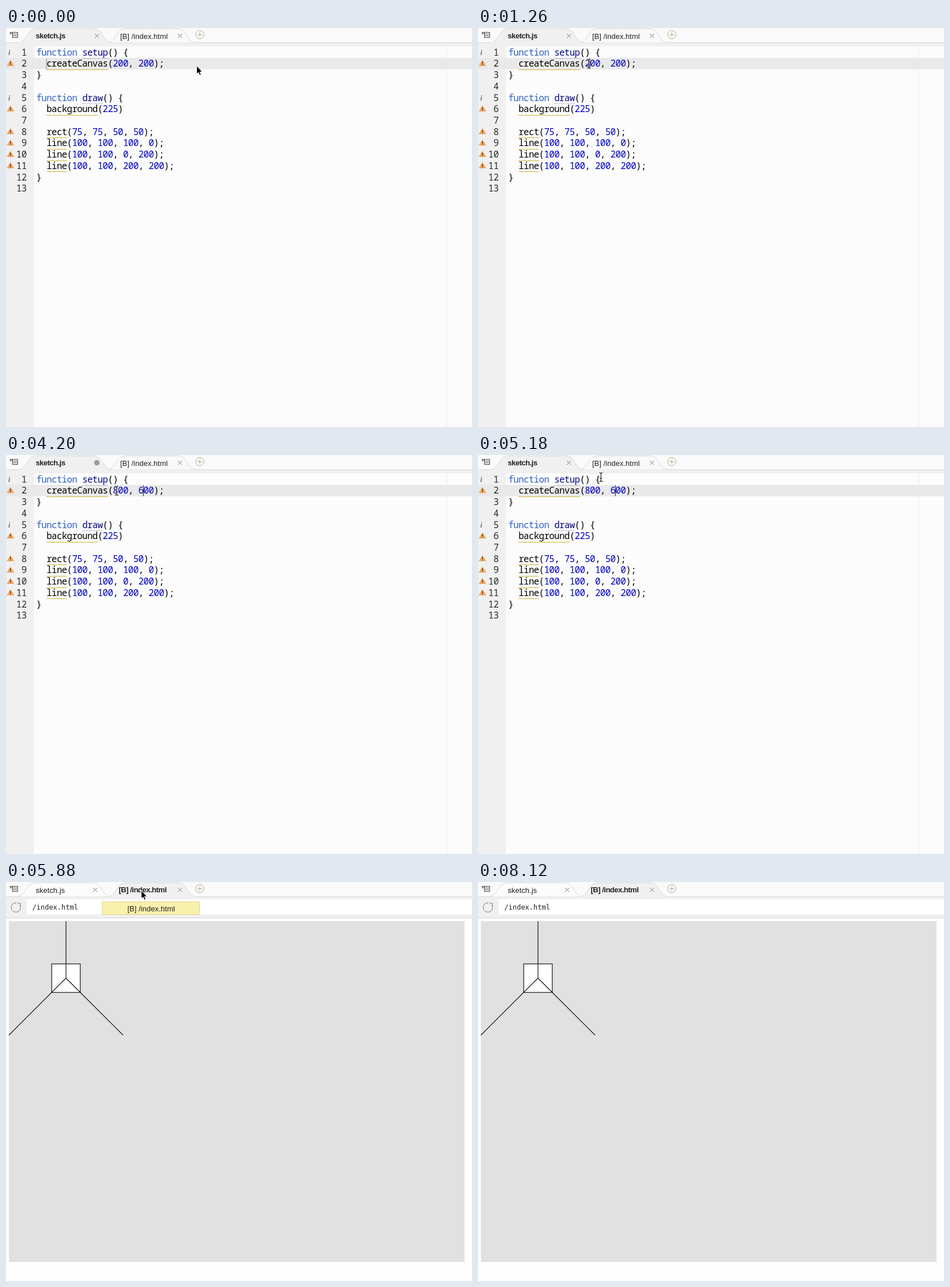
These frames come from a looping animation (808 px wide and 693 px high, 9.03 s). An HTML page:

```html
<!DOCTYPE html>
<html lang="en">
<head>
<meta charset="utf-8">
<title>Code editor</title>
<style>
  html, body { margin: 0; width: 100%; height: 100%; overflow: hidden; background: #fff; }
  svg { display: block; width: 808px; height: 693px; }
  text { white-space: pre; }
  .code { font: 15.8px "Noto Sans Mono", "DejaVu Sans Mono", monospace; letter-spacing: -.63px; fill: #000; }
  .code .kw { fill: #2f5fc4; }
  .code .def { fill: #0a0a80; }
  .code .num { fill: #0000c4; }
  .num-col { text-anchor: end; fill: #2a2a2a; }
  .ui { font: 13px "Liberation Sans", Arial, sans-serif; fill: #222; }
  .bold { font-weight: bold; letter-spacing: -.5px; }
  .info { font: italic bold 12px "Liberation Serif", serif; fill: #666; }
  .url { font: 12px "DejaVu Sans Mono", monospace; fill: #222; }
  .thin { fill: none; stroke: #777; }
  .edge { fill: none; stroke: #d6d6d6; }
  .mark { stroke: #d2b036; }
  .dots { stroke: #8c8ca8; stroke-dasharray: 1 1; }
</style>
</head>
<body>
<svg viewBox="0 0 808 693">
  <defs>
    <path id="close" class="thin" d="M-3.5 -3.5L3.5 3.5M3.5 -3.5L-3.5 3.5"/>
    <g id="warn">
      <path d="M7.7 -5L13.7 4.5H1.7Z" fill="#f2a860" stroke="#eba45e" stroke-width=".8" stroke-linejoin="round"/>
      <path d="M7.7 -2.3V1.2M7.7 2.2V3.6" stroke="#40301c" stroke-width="1.5"/>
    </g>
    <path id="tabA" d="M21 25.5C36 25.5 36 1.5 53 1.5H152C169 1.5 168 25.5 183 25.5"/>
    <path id="tabB" d="M176 25.5C191 25.5 190 1.5 207 1.5H298C315 1.5 314 25.5 330 25.5"/>
    <path id="bar" d="M-3 -8Q0 -8 0 -5V5Q0 8 -3 8M3 -8Q0 -8 0 -5M3 8Q0 8 0 5M-2 2H2"/>
  </defs>

  <rect width="808" height="693" fill="#fdfdfd"/>
  <rect width="808" height="25" fill="#fafafa"/>
  <path class="edge" d="M0 25.5H808"/>

  <g id="editor">
    <use href="#tabB" class="edge" style="fill:#f9f9f9"/>
    <rect y="26" width="808" height="667" fill="#f0f0f0"/>
    <rect x="48.5" y="32" width="760" height="661" fill="#fbfcfb"/>
    <use href="#tabA" class="edge" style="fill:#f0f0f0"/>
    <path d="M22 25.5H182" stroke="#f0f0f0"/>
    <text class="ui bold" x="51.5" y="18">sketch.js</text>
    <use id="saved" href="#close" x="157.5" y="13.5"/>
    <circle id="unsaved" cx="157.5" cy="13.5" r="4.7" fill="#9b9b9b"/>
    <text class="ui" x="198" y="18.5">[B] /index.html</text>
    <rect y="52" width="808" height="19.7" fill="#e8e9e8"/>
    <path d="M764 32V693" stroke="#e9e9e9"/>
    <g id="lines"></g>
    <path id="caret" stroke="#111" d="M0 52.5V71.5"/>
  </g>

  <g id="page">
    <use href="#tabA" class="edge" style="fill:#fbfcfb" transform="translate(-2 0)"/>
    <rect y="26" width="808" height="37" fill="#f0f0f0"/>
    <path class="edge" d="M0 62.5H808"/>
    <use href="#tabB" class="edge" style="fill:#f0f0f0"/>
    <path d="M177 25.5H329" stroke="#f0f0f0"/>
    <text class="ui" x="51.5" y="18.5">sketch.js</text>
    <use href="#close" x="154.5" y="13.5"/>
    <text class="ui bold" x="195.5" y="18">[B] /index.html</text>
    <rect x="36" y="30" width="772" height="26" fill="#fff"/>
    <path class="thin" d="M18 36A8.2 8.2 0 1 0 24.2 40M20 36.8H24.7V41.5"/>
    <text class="url" x="45.5" y="48">/index.html</text>
    <rect y="63" width="808" height="630" fill="#fefefe"/>
    <g transform="translate(5 68)">
      <rect width="790" height="592" fill="#e1e1e1"/>
      <g transform="scale(.99)" stroke="#000" stroke-width="1.1">
        <rect x="75" y="75" width="50" height="50" fill="#fff"/>
        <path d="M100 0V100L0 200M100 100L200 200" fill="none"/>
      </g>
    </g>
  </g>

  <use href="#close" x="301.5" y="13.5"/>
  <g fill="none" stroke="#a9ab8c">
    <circle cx="336" cy="11.5" r="7.2"/>
    <path d="M332 11.5H340M336 7.5V15.5"/>
  </g>
  <g fill="none" stroke="#444" stroke-width="1.2">
    <path d="M7.5 10.5V7.5H20V16.5H11.5V8M7.5 10H11.5"/>
    <path d="M13 10.5H18.5M13 13.5H18.5"/>
  </g>

  <g id="tip">
    <rect x="167" y="34.5" width="168.5" height="22" fill="#f8f1ae" stroke="#e2d783"/>
    <text class="ui" x="210.5" y="50.5">[B] /index.html</text>
  </g>

  <path id="arrow" fill="#000" stroke="#fff" stroke-linejoin="round"
    d="M0 -.5V14L3.2 11L5.3 16.3L7.8 15.3L5.7 10.2H10Z"/>
  <g id="beam" fill="none">
    <use href="#bar" stroke="#fff" stroke-width="2.6" opacity=".7"/>
    <use href="#bar" stroke="#222" stroke-width="1.2"/>
  </g>
</svg>
<script>
const LOOP = 9030, TICK = 140;
const LEFT = 52.5, CHAR = 8.85, ROW = 19.73;
const $ = id => document.getElementById(id);

const source = [
  'function setup() {', '  createCanvas(200, 200);', '}', '',
  'function draw() {', '  background(225)', '',
  '  rect(75, 75, 50, 50);', '  line(100, 100, 100, 0);',
  '  line(100, 100, 0, 200);', '  line(100, 100, 200, 200);', '}', ''
];

// time, first size, second size, caret column, caret opacity
const edits = [
  [0, '200', '200', 2, .45], [1260, '200', '200', 16, 1],
  [1820, '00', '200', 15, 1], [2240, '800', '200', 16, 1],
  [2520, '800', '200', 17, 1], [2660, '800', '200', 18, 1],
  [2940, '800', '200', 19, 1], [3080, '800', '200', 20, 1],
  [3220, '800', '200', 21, 1], [3640, '800', '00', 20, 1],
  [4200, '800', '600', 21, 1], [5320, '800', '600', 21, 0]
];

// time, x, y of the pointer
const path = [
  [0, 330.5, 66], [1120, 192, 62], [4760, 192, 62], [5600, 234.5, 15],
  [6160, 234.5, 15], [6580, 654, 266], [7840, 654, 266], [7980, 652, 292], [LOOP, 652, 292]
];

function add(parent, tag, attrs, text) {
  const el = document.createElementNS('http://www.w3.org/2000/svg', tag);
  for (const key in attrs) el.setAttribute(key, attrs[key]);
  if (text) el.textContent = text;
  return parent.appendChild(el);
}

function colour(el, line) {
  el.textContent = '';
  for (const { 0: word, index } of line.matchAll(/\d+|\w+|[^\w\s]+/g)) {
    const kind = /^\d/.test(word) ? 'num' : word === 'function' ? 'kw'
      : /setup|draw/.test(word) ? 'def' : '';
    add(el, 'tspan', { x: LEFT + index * CHAR, class: kind }, word);
  }
}

const rows = source.map((line, i) => {
  const g = $('lines'), y = 47.6 + i * ROW;
  add(g, 'text', { class: 'code num-col', x: 35.5, y }, String(i + 1));
  const row = add(g, 'text', { class: 'code', y });
  colour(row, line);
  const call = line.match(/(\w+)\(/);
  if (call) {
    const def = line.startsWith('function');
    const x = LEFT + call.index * CHAR, end = x + call[1].length * CHAR;
    const base = Math.round(y + 4.4) + .5;
    add(g, 'path', { class: def ? 'dots' : 'mark', d: `M${x} ${base}H${end}` });
    if (def) add(g, 'text', { class: 'info', x: 4, y: y - 1 }, 'i');
    else add(g, 'use', { href: '#warn', y: y - 6.2 });
  }
  return row;
});

function show(id, on) { $(id).style.display = on ? '' : 'none'; }

function pointer(t) {
  const k = path.findIndex(p => p[0] > t);
  const [t0, x0, y0] = path[k - 1], [t1, x1, y1] = path[k];
  const p = (t - t0) / (t1 - t0), e = p * p * (3 - 2 * p);
  return [x0 + (x1 - x0) * e, y0 + (y1 - y0) * e];
}

let shown = '';
function draw(time) {
  const t = Math.floor((time % LOOP) / TICK) * TICK;
  const [, w, h, col, alpha] = edits.findLast(e => e[0] <= t);
  const line = `  createCanvas(${w}, ${h});`;
  if (line !== shown) colour(rows[1], shown = line);

  const dirty = t >= 1820 && t < 4760, page = t >= 5880;
  show('editor', !page);
  show('page', page);
  show('unsaved', dirty);
  show('saved', !dirty);
  $('caret').setAttribute('opacity', alpha);
  $('caret').setAttribute('transform', `translate(${LEFT + col * CHAR} 0)`);
  show('tip', t >= 5740 && t < 6300);

  const [x, y] = pointer(t);
  const beam = t > 0 && !page && y > 32;
  show('beam', beam);
  show('arrow', !beam && t < 8120);
  for (const id of ['beam', 'arrow']) $(id).setAttribute('transform', `translate(${x} ${y})`);
}

const start = performance.now();
function frame() {
  draw(performance.now() - start);
  requestAnimationFrame(frame);
}
frame();
</script>
</body>
</html>
```
